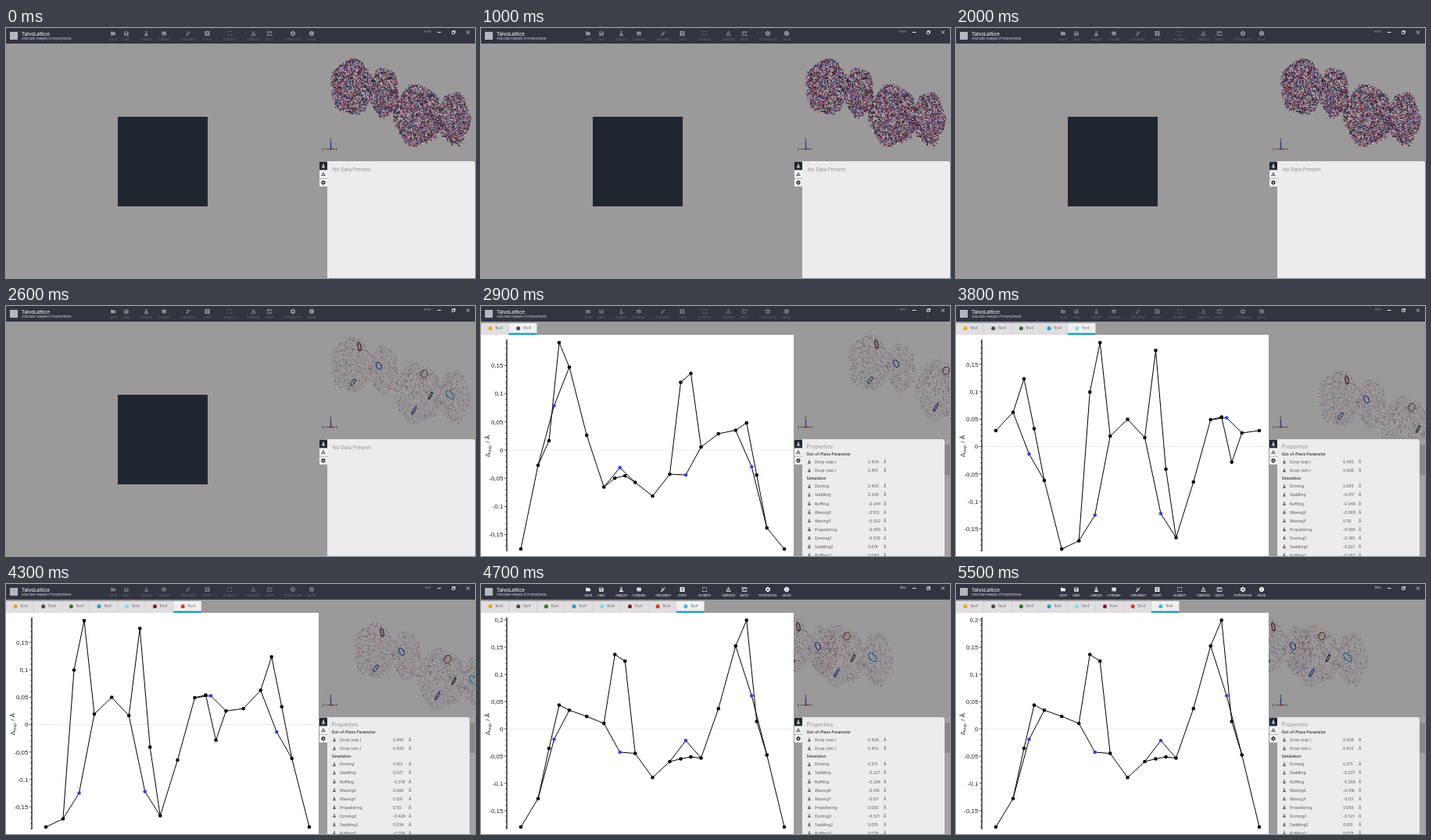
Animation, 600 px wide and 321 px high, one loop 5800 ms. Source, as an HTML page with a canvas:

```html
<!DOCTYPE html>
<html lang="en">
<head>
<meta charset="utf-8">
<title>Structure analysis</title>
<style>
html, body { margin: 0; width: 100%; height: 100%; overflow: hidden; background: #9b999a; }
canvas, svg { position: absolute; left: 0; top: 0; width: 600px; height: 321px; display: block; }
text { font-family: Inter, "Open Sans", sans-serif; }
.axis text { font-family: "Liberation Sans", Arial, sans-serif; }
</style>
</head>
<body>
<canvas id="view" width="600" height="321"></canvas>
<svg id="ui" viewBox="0 0 600 321"></svg>
<script>
const LOOP = 5800;
const ISOLATED = 2500;
const DONE = 4700;
const TAB_TIMES = [2900, 3200, 3500, 3800, 4000, 4200, 4600];
const DARK = '#1f2630';
const APP = 'TalvoLattice';
const CODE = '1hv4';

const ICONS = {
  Open: 'M2 4h8l2 3h10v13H2z',
  Save: 'M3 3h14l4 4v14H3zM6 5v5h10V5zM12 13a3 3 0 1 0 .1 0z',
  Analyze: 'M9 2h6v8l4 7H5l4-7zM11 5v7h2V5zM3 19h18v3H3z',
  Compare: 'M3 4h8V2h2v20h-2v-2H3zM14 4h7v16h-7zM5 17h5v-6z',
  Simulation: 'M2 20l12-12 3 3L5 23zM18 1l1 4 4 1-4 1-1 4-1-4-4-1 4-1zM7 2l1 3 3 1-3 1-1 3-1-3-3-1 3-1z',
  Invert: 'M2 2h20v20H2zM6 6v3h12V6zM9 12v6h6v-6z',
  Isolation: 'M2 2h5v2H4v3H2zM17 2h5v5h-2V4h-3zM2 17h2v3h3v2H2zM20 17h2v5h-5v-2h3zM10 2h4v2h-4zM10 20h4v2h-4zM2 10h2v4H2zM20 10h2v4h-2z',
  Statistics: 'M12 1l11 20H1zM12 6L5 19h14zM11 10h2v7h-2z',
  Batch: 'M1 3h22v18H1zM3 8v11h18V8zM5 10l4 3-4 4zM11 15h6v2h-6z',
  Preferences: 'M9 1h6l1 4 4-1 3 5-3 3 3 3-3 5-4-1-1 4H9l-1-4-4 1-3-5 3-3-3-3 3-5 4 1zM12 8a4 4 0 1 0 .1 0z',
  About: 'M12 1a11 11 0 1 0 .1 0zM10.500 5h3v3h-3zM10.500 10h3v9h-3z'
};
const TOOL_X = [137, 154, 179.5, 202, 233, 257.5, 286, 316.5, 337, 367, 391];
const TAB_COLORS = ['#f0a31e', '#464a4e', '#2f7420', '#1ba1c4', '#7adfee', '#7d1735', '#d2381f', '#35b9d6'];
const ROWS = ['Doop (exp.)', 'Doop (sim.)', 'Doming', 'Saddling', 'Ruffling', 'WavingX', 'WavingY',
  'Propellering', 'Doming2', 'Saddling2', 'Ruffling2'];

// Heights of the 24 ring atoms, six per quarter: meso, alpha, beta, N, beta, alpha.
const wave = {
  a: { zero: 185, step: 36.2, shift: [54, -3, 60, -4],
    y: [312, 204.5, 173, 128, 47, 78.5, 166, 232.5, 221, 207.5, 218, 226.5,
      244, 216, 98, 217, 86.5, 181, 164, 159.5, 150, 206.5, 217, 285],
    vals: [.424, .415, .420, .228, -.244, -.103, -.032, -.040, -.570, .014, .049] },
  b: { zero: 188, step: 36.2, shift: [-44, -22, -43, -21],
    y: [304.5, 239, 168, 198.5, 80, 131, 159, 187, 211, 167, 153.5, 171,
      220.5, 290, 189.5, 290.5, 51, 191, 157.5, 188, 46.5, 294, 116, 312],
    vals: [.494, .431, .489, .016, .253, .152, -.069, -.110, -.603, -.022, .157] },
  c: { zero: 180.5, step: 35.2, shift: [29, 10, 30, 9.5],
    y: [312, 301.5, 110.5, 268.5, 47, 167, 145.5, 169, 57, 266.5, 209.5, 297.5,
      226, 146, 142.5, 143.5, 200.5, 163, 160, 136.5, 93.5, 190, 157.5, 224],
    vals: [.495, .420, .103, .021, -.276, .086, .128, .112, -.428, .034, -.074] },
  d: { zero: 186, step: 35, shift: [-46, 3, -67, -20],
    y: [312, 275.5, 211, 199.5, 155.5, 162, 170, 179, 90.5, 216, 99, 217.5,
      248.5, 228, 224.5, 201, 222, 223.5, 160, 79.5, 46.5, 143.5, 176.5, 219.5],
    vals: [.428, .422, .371, -.227, -.258, -.016, -.121, .050, -.521, .010, .079] }
};
const turned = (w, n, shift) => ({ ...w, shift,
  y: [...w.y.slice(n), ...w.y.slice(0, n)],
  vals: w.vals.map((v, i) => i < 2 ? v - .012 : v * (i % 2 ? -.8 : .9)) });
const RUNS = [wave.a, wave.b, turned(wave.a, 12, [-22, -39, -22, -39]),
  turned(wave.c, 18, [48, 43, 48, 43]), turned(wave.d, 6, [-35, 8, -35, 8]), wave.c, wave.d];

const text = (x, y, s, size, fill, extra = '') =>
  `<text x="${x}" y="${y}" font-size="${size}" fill="${fill}" ${extra}>${s}</text>`;
const rect = (x, y, w, h, fill, extra = '') =>
  `<rect x="${x}" y="${y}" width="${w}" height="${h}" fill="${fill}" ${extra}/>`;
const line = (x1, y1, x2, y2, stroke, w = 1, extra = '') =>
  `<line x1="${x1}" y1="${y1}" x2="${x2}" y2="${y2}" stroke="${stroke}" stroke-width="${w}" ${extra}/>`;
const icon = (name, cx, cy, size, fill, extra = '') =>
  `<path d="${ICONS[name]}" fill="${fill}" fill-rule="evenodd" ${extra}
    transform="translate(${cx - size / 2} ${cy - size / 2}) scale(${size / 24})"/>`;
const MID = 'text-anchor="middle"';

function titleBar(loaded, enabled) {
  let s = rect(0, 0, 600, 20, '#303540') + rect(5, 5, 10, 10, '#b4b7bc');
  s += text(20, 10, APP, 6.2, '#f0f0f2', 'font-weight="500"');
  s += text(20, 15, 'Structural Analysis of Porphyrinoids', 3.75, '#e0e1e4');
  Object.keys(ICONS).forEach((name, i) => {
    const dim = loaded ? .34 : name === 'Isolation' ? .3 : .5;
    s += icon(name, TOOL_X[i], 7, 7, '#fff', `opacity="${enabled ? 1 : dim}"`);
    s += text(TOOL_X[i], 15.6, name, 4, '#fff', `${MID} opacity="${enabled ? .95 : .24}"`);
  });
  s += text(539.5, 5.5, loaded ? CODE : 'None', 3.7, '#fff', `${MID} opacity="${enabled ? .9 : .5}"`);
  s += line(552, 5.5, 556.5, 5.5, '#eee');
  s += '<path d="M570.500 4.500h3v3h-3zM571.500 4.500v-1h3v3h-1M589 3.500l4 4M593 3.500l-4 4" fill="none" stroke="#eee" stroke-width=".8"/>';
  return s;
}

function orientation() {
  return line(415.5, 155.500, 415.5, 146, '#26369a', 1.4) + line(415.5, 155.500, 408.500, 155.500, '#2c6a3c') +
    line(415.5, 155.500, 421, 155.500, '#333b45') + '<circle cx="415.5" cy="155.500" r="1.3" fill="#8f2b32"/>' +
    text(415.5, 144.500, 'z', 5, '#222', MID) + text(406, 157, 'y', 4.5, '#333', MID) + text(423, 157, 'x', 4.5, '#333', MID);
}

function panel(run) {
  let s = run ? rect(593, 171, 7, 150, '#a3a1a2') + rect(593.5, 178, 6.5, 39, '#89878a') : '';
  s += `<path d="M411 171h${run ? 179 : 186}q3 0 3 3v147H411z" fill="#edebee"/>`;
  ['Analyze', 'Statistics', 'Preferences'].forEach((name, i) => {
    s += rect(401, 172 + i * 10.700, 10, 10, i ? '#f4f3f5' : DARK, 'rx="1"');
    s += icon(name, 406, 177 + i * 10.700, 6, i ? '#222' : '#fff');
  });
  if (!run) return s + text(418, 184, 'No Data Present', 6.3, '#929094');
  s += text(416.5, 183.200, 'Properties', 7, '#96949a');
  s += text(416.5, 192, 'Out-of-Plane Parameter', 4.9, '#3c3b40', 'font-weight="600"');
  s += text(416.5, 223.200, 'Simulation', 4.9, '#3c3b40', 'font-weight="600"');
  ROWS.forEach((name, i) => {
    const y = i < 2 ? 200 + i * 11 : 231.5 + (i - 2) * 11.050;
    s += icon('Analyze', 420, y, 5.5, '#44434a') + text(427, y + 1.9, name, 5, '#55535a');
    s += text(495, y + 1.9, run.vals[i].toFixed(3), 5, '#55535a') + text(515, y + 1.9, 'Å', 5, '#55535a');
  });
  return s;
}

function tabs(count) {
  let s = rect(0, 20, 400, 17, '#9b999a');
  for (let i = 0; i < count; i++) {
    const x = i * 35.700, active = i === count - 1;
    s += rect(x, 22, 35.700, 15, active ? '#f1f0f2' : '#e0dee0');
    s += line(x + 35.700, 22, x + 35.700, 37, '#c4c2c5', .5);
    s += `<circle cx="${x + 12}" cy="28.700" r="2.500" fill="${TAB_COLORS[i]}"/>`;
    s += text(x + 18, 30.200, CODE, 4.5, '#66656a');
    if (active) s += rect(x, 34.700, 35.700, 2.3, '#1a9dbb');
  }
  return s;
}

function chart({ zero, step, y }) {
  const offsets = [0, 22, 36, 42.5, 49, 62];
  const at = i => [51 + 84.25 * Math.floor(i / 6) + offsets[i % 6], y[i % 24]];
  let s = rect(0, 37, 400, 284, '#fff') + '<g class="axis">';
  s += line(33, zero, 398, zero, '#cfcfd2', .7, 'stroke-dasharray="1.500 1"');
  s += line(33, 43, 33, 315, '#111', 1.3);
  for (let k = -20; k <= 20; k++) {
    const ty = zero - k * step / 5;
    if (ty < 43 || ty > 315) continue;
    s += line(k % 5 ? 31.200 : 29.700, ty, 33, ty, '#222', .8);
    if (k % 5 === 0) s += text(28.500, ty + 2.8, String(k / 100).replace('.', ','), 8, '#222', 'text-anchor="end"');
  }
  s += `<text transform="translate(11 180) rotate(-90)" ${MID} font-size="8" fill="#222">Δ<tspan font-size="5" dy="1.500">msp.</tspan><tspan dy="-1.500"> / Å</tspan></text></g>`;
  let bonds = '', atoms = '';
  for (let q = 0; q < 24; q += 6) {
    bonds += 'M' + [0, 1, 2, 4, 5, 6].map(k => at(q + k)).join('L') + 'M' + [1, 3, 5].map(k => at(q + k)).join('L');
  }
  for (let i = 0; i <= 24; i++) {
    const [cx, cy] = at(i);
    atoms += `<circle cx="${cx}" cy="${cy}" r="2.300" fill="${i % 6 === 3 ? '#3a3fe0' : '#000'}"/>`;
  }
  return s + `<path d="${bonds}" fill="none" stroke="#000" stroke-width="1"/>` + atoms;
}

// Molecule: seeded dots inside four lobes, two per cluster.
let seed = 7;
const rnd = () => (seed = seed * 16807 % 2147483647) / 2147483647;
const LOBES = [[442, 75, 28, 36, 0], [483, 82, 19, 32, 0], [526, 112, 31, 40, 1], [573, 116, 20, 35, 1]];
const PALETTE = ['#17171c', '#17171c', '#1f1f28', '#25252e', '#3b3b86', '#5450a4', '#bf2c3c', '#c94a58', '#cdc8d2', '#b9b2c0', '#6d6872'];
const dots = LOBES.flatMap(([cx, cy, rx, ry, cluster]) =>
  Array.from({ length: Math.round(rx * ry * 2.6) }, () => {
    const a = rnd() * Math.PI * 2;
    const r = Math.pow(rnd(), .48) * (.93 + .05 * Math.sin(a * 5 + cx) + rnd() * .08);
    return { x: cx + rx * r * Math.cos(a), y: cy + ry * r * Math.sin(a), cluster,
      color: PALETTE[Math.floor(rnd() * PALETTE.length)], kept: rnd() < .46 };
  }));
const RINGS = [
  [452, 52, 2, 5.5, -.2, '#5c1f26'], [477, 77, 3, 5, -.5, '#263f9c'], [444, 98, 1.8, 5, .6, '#4b5068'],
  [535, 87, 4, 5, .2, '#6b4a38'], [543, 115, 1.2, 5, .5, '#33343c'], [568, 114, 3.6, 6.5, -.7, '#1c7bb4'],
  [522, 134, 1.2, 6, .5, '#2c3d86']];

const ctx = document.getElementById('view').getContext('2d');
function molecule(isolated, shift) {
  ctx.clearRect(0, 0, 600, 321);
  ctx.save();
  ctx.beginPath();
  ctx.rect(400, 20, 200, 150);
  ctx.clip();
  const size = isolated ? .75 : 1.25;
  ctx.globalAlpha = isolated ? .6 : 1;
  for (const d of dots) {
    if (isolated && !d.kept) continue;
    ctx.fillStyle = d.color;
    ctx.fillRect(d.x + shift[d.cluster * 2], d.y + shift[d.cluster * 2 + 1], size, size);
  }
  ctx.globalAlpha = 1;
  if (isolated) {
    for (const [x, y, rx, ry, angle, color] of RINGS) {
      const k = x > 500 ? 2 : 0;
      ctx.beginPath();
      ctx.ellipse(x + shift[k], y + shift[k + 1], rx, ry, angle, 0, Math.PI * 2);
      ctx.setLineDash([]);
      ctx.lineWidth = 1.1;
      ctx.strokeStyle = color;
      ctx.stroke();
      ctx.setLineDash([1, 2.5]);
      ctx.strokeStyle = '#14161c';
      ctx.stroke();
    }
  }
  ctx.restore();
}

const ui = document.getElementById('ui');
let shown = '';
function render(t) {
  const isolated = t >= ISOLATED, enabled = t >= DONE;
  const finished = TAB_TIMES.filter(start => t >= start).length;
  const key = [isolated, enabled, finished].join();
  if (key === shown) return;
  shown = key;
  const run = RUNS[finished - 1];
  molecule(isolated, run ? run.shift : [0, 0, 0, 0]);
  ui.innerHTML = (run ? tabs(finished + 1) + chart(run) : rect(143, 114, 115, 115, DARK)) +
    orientation() + panel(run) + titleBar(!!run, enabled);
}

const begin = performance.now();
function tick() {
  render((performance.now() - begin) % LOOP);
  requestAnimationFrame(tick);
}
tick();
</script>
</body>
</html>
```
